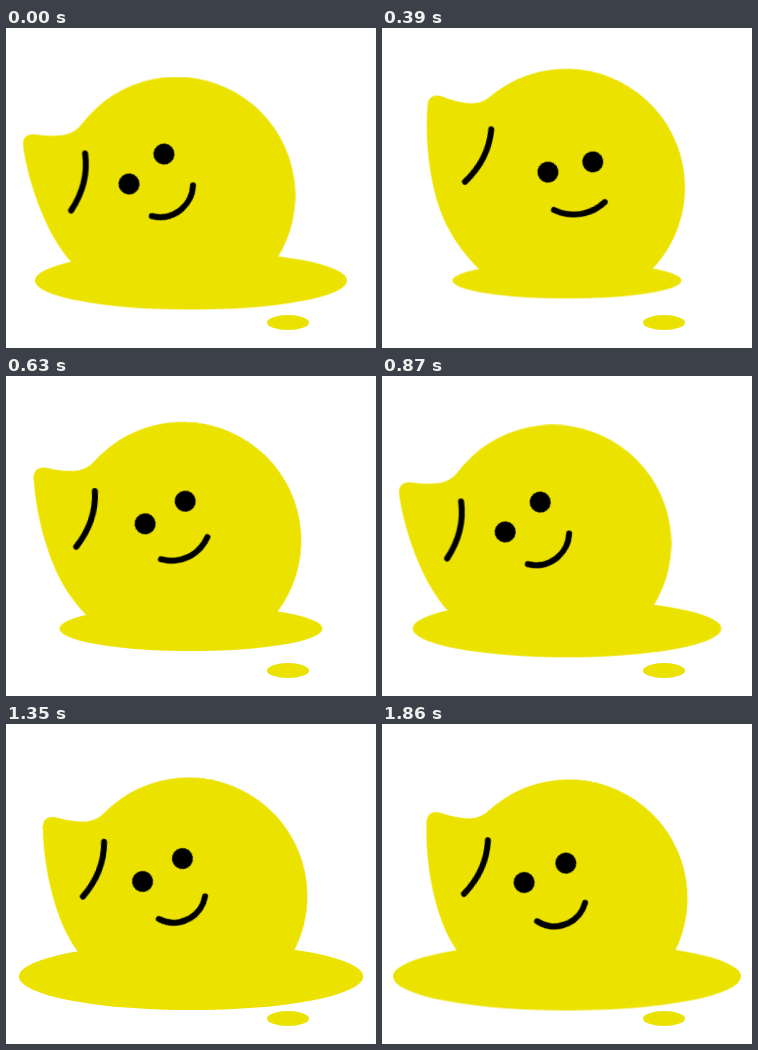
Recreate the animation shown at these times as an HTML page without scripts. Size 370 by 320 pixels, loop 2430 ms.

```html
<!DOCTYPE html>
<html lang="en">
<head>
<meta charset="utf-8">
<title>Melting blob</title>
<style>
  html, body { margin: 0; width: 100%; height: 100%; overflow: hidden; background: #fff; }
  svg { display: block; width: 370px; height: 320px; }

  :root {
    --in: cubic-bezier(.33, 0, .67, .33);
    --out: cubic-bezier(.33, .67, .67, 1);
    --melt: cubic-bezier(.333, .743, .667, 1);
  }

  .yellow { fill: #ece200; }
  .line { fill: none; stroke: #000; stroke-width: 6; stroke-linecap: round; }

  .puddle, .head, .crease, .face, .mouth {
    transform-origin: 0 0;
    animation: 2430ms linear infinite;
  }
  .puddle { animation-name: puddle; }
  .head { animation-name: head; }
  .crease { animation-name: crease; }
  .face { animation-name: face; }
  .mouth { animation-name: mouth; }

  @keyframes puddle {
    0% { transform: scale(.897, .859); animation-timing-function: step-end; }
    1.22% { transform: scale(.46, .256); }
    16.05% { transform: scale(.658, .53); animation-timing-function: var(--melt); }
    66.67%, 100% { transform: scale(1, 1); }
  }

  @keyframes head {
    0% { transform: translate(170.6px, 167.5px) rotate(0deg); animation-timing-function: step-end; }
    1.22% { transform: translate(185px, 149.5px) rotate(14deg); }
    11.11% { transform: translate(185.5px, 157px) rotate(14.2deg); animation-timing-function: var(--in); }
    16.05% { transform: translate(184.3px, 159.5px) rotate(12.9deg); }
    25.93% { transform: translate(176.6px, 164.6px) rotate(4.8deg); animation-timing-function: var(--out); }
    35.8% { transform: translate(170.6px, 167.5px) rotate(0deg); animation-timing-function: var(--in); }
    45.68% { transform: translate(174.2px, 169.2px) rotate(2.1deg); }
    55.56% { transform: translate(182.7px, 172.2px) rotate(7.4deg); animation-timing-function: var(--out); }
    67.9%, 100% { transform: translate(186.8px, 174.2px) rotate(10.3deg); }
  }

  @keyframes crease {
    0% { transform: translate(0, 0); animation-timing-function: step-end; }
    1.22% { transform: translate(6px, 2px); }
    16.05% { transform: translate(5.5px, 2px); }
    25.93%, 45.68% { transform: translate(0, 0); }
    55.56% { transform: translate(.6px, -1px); }
    67.9%, 100% { transform: translate(1.6px, -.5px); }
  }

  @keyframes face {
    0% { transform: translate(140.5px, 141px) rotate(-40.6deg); animation-timing-function: step-end; }
    1.22% { transform: translate(192px, 130px) rotate(-8deg); }
    11.11% { transform: translate(192.5px, 137.5px) rotate(-10deg); animation-timing-function: var(--in); }
    16.05% { transform: translate(188.5px, 139px) rotate(-12.8deg); }
    25.93% { transform: translate(159.2px, 136.5px) rotate(-29.4deg); animation-timing-function: var(--out); }
    35.8% { transform: translate(140.7px, 141px) rotate(-40.4deg); animation-timing-function: var(--in); }
    45.68% { transform: translate(144.2px, 142.5px) rotate(-38.5deg); }
    55.56% { transform: translate(156.5px, 146px) rotate(-29.9deg); animation-timing-function: var(--out); }
    67.9%, 100% { transform: translate(163px, 148.8px) rotate(-24.9deg); }
  }

  @keyframes mouth {
    0% { d: path("M-25.7 0A33.2 33.2 0 0 0 25.7 0"); animation-timing-function: step-end; }
    1.22%, 16.05% { d: path("M-24.7 -1A45 45 0 0 0 26.7 -1"); }
    25.93% { d: path("M-25.7 -.6A39 39 0 0 0 25.7 -.6"); }
    35.8% { d: path("M-25.7 0A33.2 33.2 0 0 0 25.7 0"); }
    45.68% { d: path("M-26.3 1.2A33 33 0 0 0 25.1 1.2"); }
    55.56%, 100% { d: path("M-26.5 1.4A31.9 31.9 0 0 0 24.9 1.4"); }
  }
</style>
</head>
<body>
<svg viewBox="0 0 370 320">
  <clipPath id="above"><rect width="370" height="252.5"/></clipPath>

  <ellipse class="yellow" cx="282" cy="294.5" rx="21" ry="7.5"/>
  <g transform="translate(185 252.5)">
    <ellipse class="yellow puddle" rx="174" ry="34"/>
  </g>

  <g clip-path="url(#above)">
    <g class="head">
      <path class="yellow" d="M-153.5 -49C-155 -57 -149.5 -62 -141.5 -61C-120 -58.5 -104.5 -58.5 -95 -71.2A118.7 118.7 0 1 1 -30.5 114.7C-58 107 -85 90 -104.5 67.5C-128.5 42 -147.5 -8 -153.5 -49Z"/>
      <path class="line crease" d="M-91.5 -42Q-87.5 -12 -105.5 15"/>
    </g>
  </g>

  <g class="face">
    <circle cx="-23" r="10.5"/>
    <circle cx="23" r="10.5"/>
    <g transform="translate(-1 41) rotate(4)">
      <path class="line mouth" d="M-25.7 0A33.2 33.2 0 0 0 25.7 0"/>
    </g>
  </g>
</svg>
</body>
</html>
```
